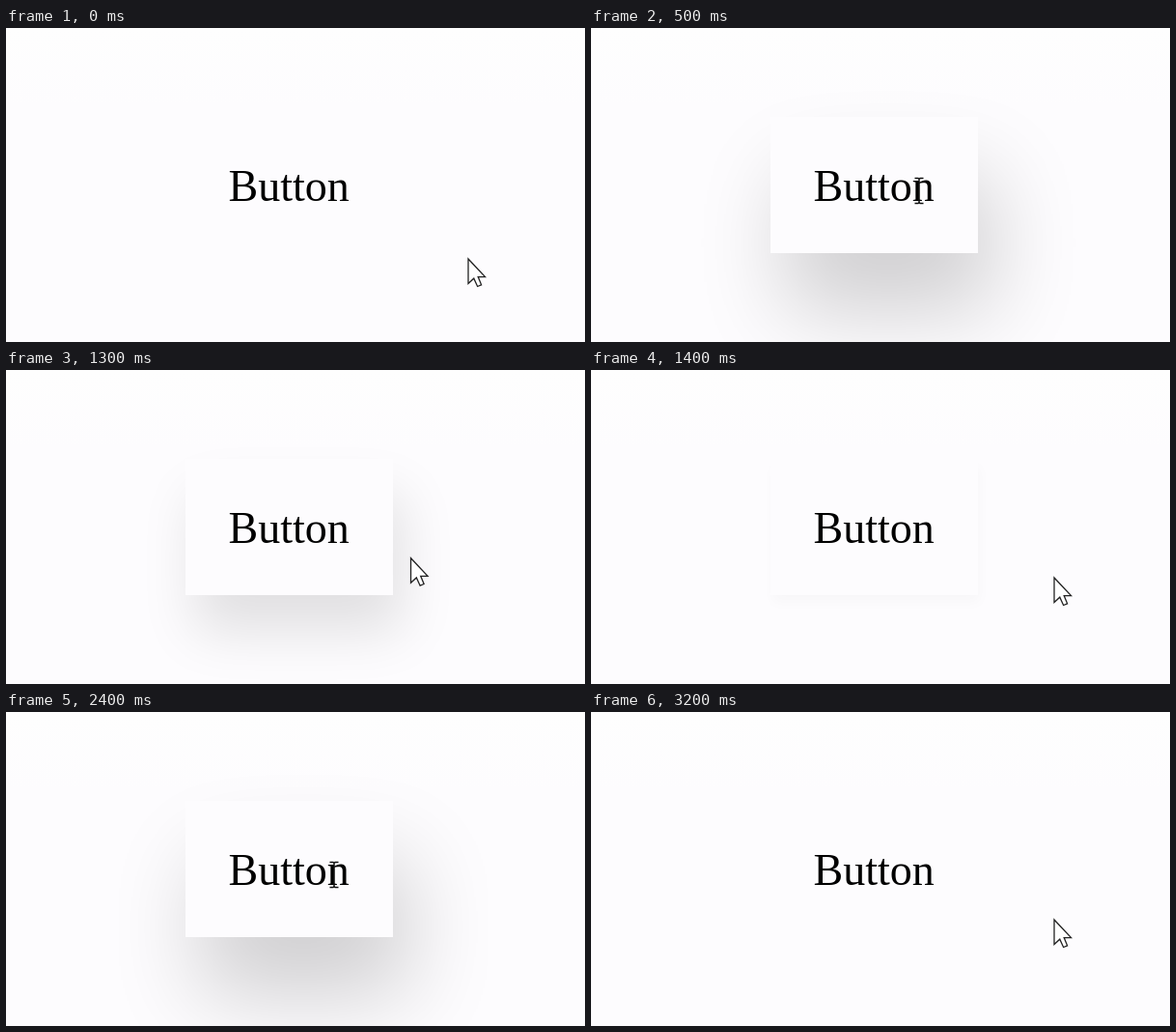
An HTML page that plays this animation: 600x325 px, repeating every 3300 ms.

```html
<!DOCTYPE html>
<html lang="en">
<head>
<meta charset="utf-8">
<title>Button hover shadow</title>
<style>
  html, body { margin: 0; width: 100%; height: 100%; overflow: hidden; }
  body { position: relative; background: linear-gradient(#fefefe, #fdfcfe 80px); }
  #button { position: absolute; left: 186px; top: 92px; width: 215px; height: 141px; }
  svg { position: absolute; left: 0; top: 0; }
  text { font: 46px "Liberation Serif", "Times New Roman", serif; }
</style>
</head>
<body>
<div id="button"></div>
<svg width="600" height="325" viewBox="0 0 600 325">
  <text x="230.5" y="179">Button</text>
  <path id="arrow" d="M0 0V25.5L5.8 20.2L9.6 28.5L13.6 26.8L10.2 18.6H17.5Z"
        fill="#fff" stroke="#222" stroke-width="1.3"/>
  <path id="beam" d="M-4.5 -12.5H-1L0 -11.5L1 -12.5H4.5M0 -11.5V12.5M-4.5 13.5H-1L0 12.5L1 13.5H4.5"
        fill="none" stroke="#111" stroke-width="1.5"/>
</svg>
<script>
const LOOP = 3300, STEP = 100, FADE = 300;
const button = document.getElementById('button');
const arrow = document.getElementById('arrow');
const beam = document.getElementById('beam');

// Pointer stops: time, x, y
const pointer = [
  [0, 479, 239], [80, 479, 239], [300, 340, 168], [1180, 340, 168],
  [1400, 480, 215], [1650, 480, 215], [1900, 337, 168], [2000, 340, 168],
  [2780, 340, 168], [3000, 480, 215], [LOOP, 480, 215]
];
const hovers = [[220, 1230], [1880, 2880]];
const beamTimes = [[300, 1200], [2000, 2800]];

const clamp = v => Math.min(1, Math.max(0, v));
const bezier = (a, b, u) => 3 * a * u * (1 - u) ** 2 + 3 * b * u * u * (1 - u) + u ** 3;

// CSS "ease" timing curve
function ease(x) {
  if (x <= 0 || x >= 1) return clamp(x);
  let low = 0, high = 1;
  for (let i = 0; i < 20; i++) {
    const mid = (low + high) / 2;
    if (bezier(0.25, 0.25, mid) < x) low = mid; else high = mid;
  }
  return bezier(0.1, 1, low);
}

function pointerAt(t) {
  const i = pointer.findIndex(stop => stop[0] > t);
  const [t0, x0, y0] = pointer[i - 1], [t1, x1, y1] = pointer[i];
  const u = (t - t0) / (t1 - t0), s = u * u * (3 - 2 * u);
  return [x0 + (x1 - x0) * s, y0 + (y1 - y0) * s];
}

const hoverAt = t => hovers.reduce((sum, [enter, leave]) =>
  sum + ease((t - enter) / FADE) - ease((t - leave) / FADE), 0);

function draw(time) {
  const t = Math.floor((time % LOOP) / STEP) * STEP;
  const p = hoverAt(t);
  button.style.boxShadow = p > 0
    ? `${15 * p}px ${60 * p}px ${90 * p}px rgba(0, 0, 0, ${0.18 * p})`
    : 'none';

  const [x, y] = pointerAt(t);
  const isBeam = beamTimes.some(([from, to]) => t >= from && t < to);
  for (const shape of [arrow, beam]) {
    shape.setAttribute('transform', `translate(${x} ${y})`);
    shape.setAttribute('visibility', (shape === beam) === isBeam ? 'visible' : 'hidden');
  }
}

let start;
function tick(now) {
  start ??= now;
  draw(Math.max(0, now - start));
  requestAnimationFrame(tick);
}
draw(0);
requestAnimationFrame(tick);
</script>
</body>
</html>
```
